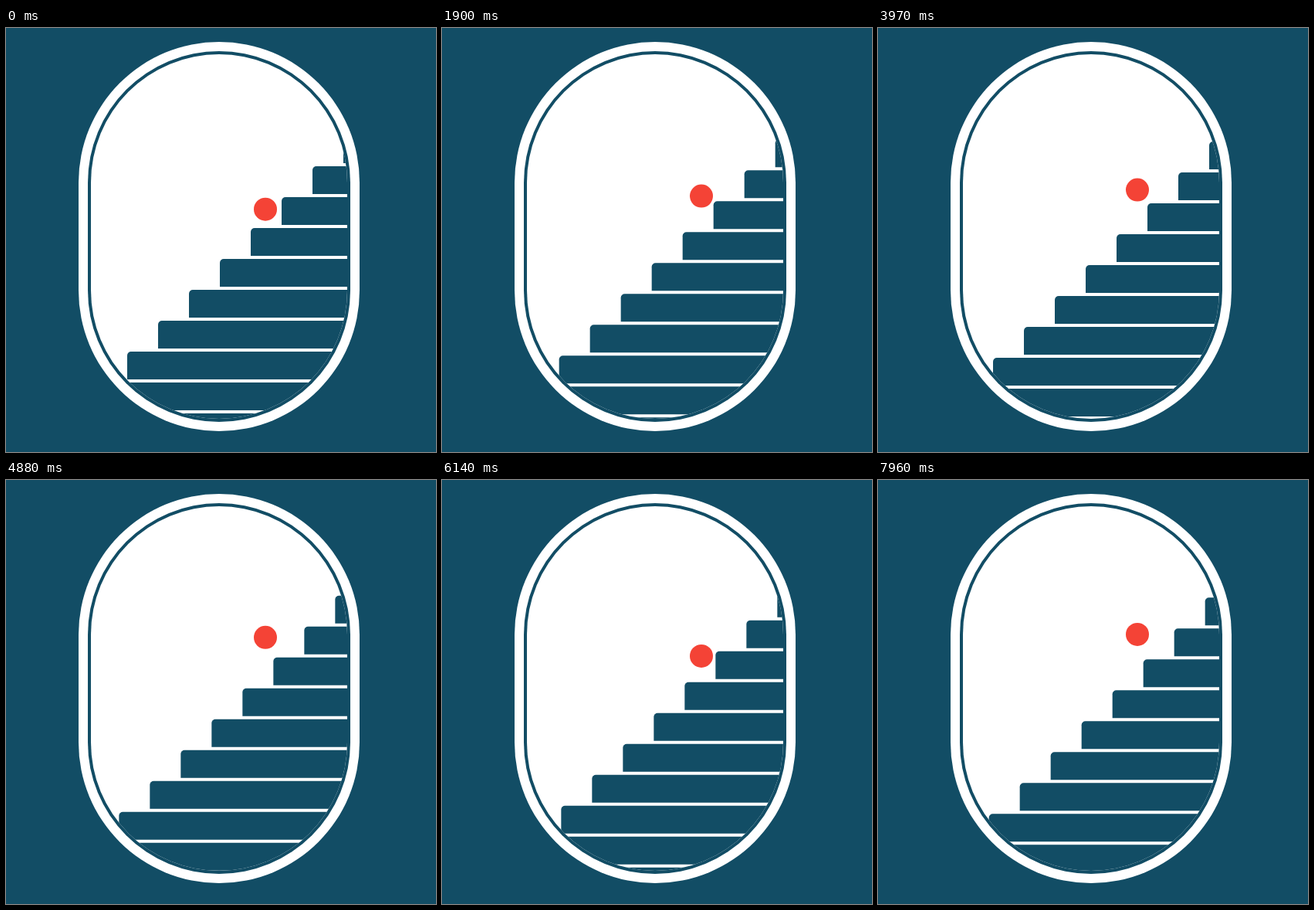
Animation, 557 px wide and 549 px high, one loop 8000 ms. Source, as an HTML page with a canvas:

```html
<!DOCTYPE html>
<html lang="en">
<head>
<meta charset="utf-8">
<title>Ball bouncing down the stairs</title>
<style>
  html, body { margin: 0; width: 100%; height: 100%; overflow: hidden; background: #124d65; }
  canvas { display: block; }
</style>
</head>
<body>
<canvas id="stage" width="557" height="549"></canvas>
<script>
const ctx = document.getElementById('stage').getContext('2d');
const NAVY = '#124d65', WHITE = '#fff', RED = '#f44336';

// The picture advances in ticks of 70 ms, a few of them 60 ms; 15 ticks make one stair step.
const LOOP = 8000, TICKS_PER_STEP = 15, STEP = 40;
const shortTicks = new Set([2, 5, 8, 11, 18, 25, 45, 53, 58]);

function tickAt(time) {
  let tick = 0;
  let end = 70;
  while (time >= end) {
    tick++;
    end += shortTicks.has(tick) ? 60 : 70;
  }
  return tick;
}

function capsule(inset) {
  ctx.beginPath();
  ctx.roundRect(94 + inset, 18 + inset, 364 - 2 * inset, 504 - 2 * inset, 182 - inset);
}

function fillCapsule(inset, color) {
  capsule(inset);
  ctx.fillStyle = color;
  ctx.fill();
}

function drawStairs(phase) {
  const shift = STEP * phase;
  ctx.fillStyle = NAVY;
  for (let i = -5; i <= 7; i++) {
    const x = 317 - STEP * i + shift;
    const y = 259 + STEP * i - shift;
    ctx.beginPath();
    ctx.roundRect(x, y, 600 - x, 36, [5, 0, 0, 0]);
    ctx.fill();
  }
}

function drawBall(phase) {
  const fromLow = (phase + 0.015) % 1;
  const fall = Math.abs(2 * fromLow - 1);   // 0 at the apex, 1 at the bounce
  ctx.fillStyle = RED;
  ctx.beginPath();
  ctx.arc(336, 196.7 + 41 * fall ** 2.5, 15, 0, 2 * Math.PI);
  ctx.fill();
}

function draw(time) {
  const phase = tickAt(time % LOOP) % TICKS_PER_STEP / TICKS_PER_STEP;
  ctx.fillStyle = NAVY;
  ctx.fillRect(0, 0, 557, 549);
  fillCapsule(0, WHITE);
  fillCapsule(12, NAVY);
  fillCapsule(16, WHITE);

  ctx.save();
  capsule(16);
  ctx.clip();
  drawStairs(phase);
  drawBall(phase);
  ctx.restore();
}

const start = performance.now();
function frame() {
  draw(performance.now() - start);
  requestAnimationFrame(frame);
}
frame();
</script>
</body>
</html>
```
